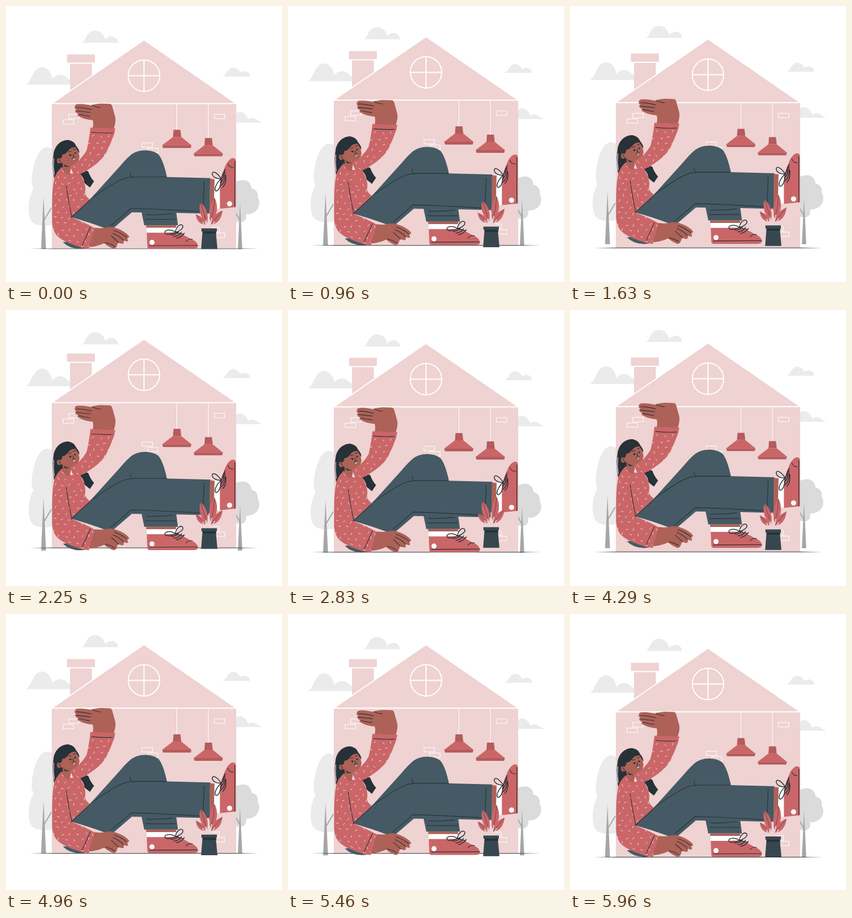
Write an HTML page that moves like this. It is 500 px wide and 500 px high and loops after 6 s.

```html
<!DOCTYPE html>
<html lang="en">
<head>
<meta charset="utf-8">
<title>House too small</title>
<style>
html, body { margin: 0; width: 100%; height: 100%; overflow: hidden; background: #fff; }
svg { display: block; width: 100vw; height: 100vh; }
.cloud, .tree1 { fill: #ebebeb; }
.tree2 { fill: #dbdbdb; }
.trunk { fill: #a6a6a6; }
.twig { fill: none; stroke: #a6a6a6; stroke-width: 2; }
.wall { fill: #efd2d2; }
.white { fill: none; stroke: #fff; stroke-width: 2; }
.thin { fill: none; stroke: #fff; stroke-width: 1; }
.sock { fill: #fff; }
.red { fill: #ca6668; }
.shade { fill: #b55b5c; }
.skin { fill: #ad6157; }
.dark { fill: #263238; }
.denim { fill: #455a64; }
.pot { fill: #37474f; }
.ink { fill: none; stroke: #263238; stroke-width: 1.1; stroke-linecap: round; stroke-linejoin: round; }
.lace { fill: none; stroke: #263238; stroke-width: 1.5; stroke-linecap: round; stroke-linejoin: round; }
.vein { fill: none; stroke: #263238; stroke-width: .6; }
.stem { fill: none; stroke: #efd2d2; stroke-width: 1.8; }
.dash { fill: none; stroke: #f3dede; stroke-width: 1; stroke-linecap: round; }
</style>
</head>
<body>
<svg id="stage" viewBox="0 0 500 500">
  <defs>
    <clipPath id="knit"><path id="knitBody"/><path id="knitArm"/></clipPath>
  </defs>
  <g id="scenery"></g>
  <g id="house"></g>
  <g id="person"></g>
  <g id="plant"></g>
</svg>
<script>
const $ = id => document.getElementById(id);
const path = (cls, d) => `<path class="${cls}" d="${d}"/>`;
const dot = (cls, x, y, r) => `<circle class="${cls}" cx="${x}" cy="${y}" r="${r}"/>`;
const box = (cls, x, y, w, h) => `<rect class="${cls}" x="${x}" y="${y}" width="${w}" height="${h}"/>`;

$('scenery').innerHTML = [
  path('cloud', 'M137.500 67C144 65 146 45 161 45C174 45 178 55 180 61C184 56 190 55 194 56C200 57 202 62 203.500 67Z'),
  path('cloud', 'M36 142.800C46 140 48 111 65.500 111C78 111 83 126 84 132C91 123 104 122 111 131L128 142.800Z'),
  path('cloud', 'M392 128C400 126 401 112 411 112C419 112 423 117 424 121C430 117 442 117 442 128Z'),
  path('cloud', 'M404 211.500C412 207 414 192 424 192C433 192 437 202 439 206C444 201 454 204 456 208Q461 209 463 211.500Z'),
  path('tree1', 'M75 256C58 254 47 292 46.500 318Q47 327 50 332C41 342 36 382 49 393C58 400 80 400 95 394V268Q86 257 75 256Z'),
  path('tree2', 'M410 322Q420 315 431 315.500Q443 317 445 331C453 332 457 338 456 347C461 355 459 367 452 372Q444 379 435 377Q437 389 427 392Q417 393 410 387Z'),
  path('trunk', 'M68 345L72.500 440.500H63.500Z'),
  path('twig', 'M69 388L82 366'),
  path('trunk', 'M424 357L428 440.500H420Z'),
  path('twig', 'M423.500 388L416 375')
].join('');

const lamp = (x, y) => path('thin', `M${x} 178V${y}`) +
  path('shade', `M${x - 6} ${y}H${x + 6.5}L${x + 8} ${y + 13}H${x - 7}Z`) +
  path('red', `M${x - 7} ${y + 13}H${x + 8}L${x + 26.5} ${y + 28}H${x - 26.5}Z`) +
  path('shade', `M${x - 26.5} ${y + 28}H${x + 26.5}L${x + 25} ${y + 33}H${x - 25}Z`);
const bricks = [[113.5, 196.7], [103.5, 206.7], [246.5, 248.5], [256.5, 258.5], [377.5, 196.7], [377.5, 411.7], [367.5, 401.7]];

$('house').innerHTML = [
  box('wall', 116, 100, 39.5, 60),
  box('wall', 110.5, 88.3, 50.5, 15),
  path('white', 'M110 104.200H161'),
  box('wall', 83, 177.3, 334, 263),
  path('dark', 'M43 440.400L84 440H417L458 440.400L417 440.900H84Z'),
  `<path class="wall" stroke="#fff" stroke-width="2" d="M83 177.200L250 62L417 177.200Z"/>`,
  dot('white', 250, 126.8, 28.5),
  path('white', 'M250 98.500V155.500M221.500 126.800H278.500'),
  bricks.map(([x, y]) => box('thin', x, y, 19, 8)).join(''),
  lamp(309.5, 224.7),
  lamp(366.5, 239.7)
].join('');

const bodyShape = 'M101 292Q92 300 88 311C82 335 84 365 83.500 393Q85 409 93 417C103 427 125 434 137 438L150 440L161.500 403Q140 391 120 384L152 351Q144 345 143 339Q145 330 142 320L134 302L118 304Z';
const armShape = 'M153 220.500L198 222L196 232Q190 249 182 265C174 281 155 293 142 301Q132 307 122 304L116 291Q136 280 146 262Q150 246 153 220.500Z';
$('knitBody').setAttribute('d', bodyShape);
$('knitArm').setAttribute('d', armShape);

let seed = 11;
const rand = () => (seed = (seed * 16807) % 2147483647) / 2147483647;
let flecks = '';
for (let y = 235, row = 0; y < 438; y += 10.5, row++) {
  for (let x = 86 + (row % 2) * 7; x < 198; x += 14) {
    const a = rand() * Math.PI;
    const cx = x + rand() * 4, cy = y + rand() * 4;
    const dx = Math.cos(a) * 1.8, dy = Math.sin(a) * 1.8;
    flecks += `M${(cx - dx).toFixed(1)} ${(cy - dy).toFixed(1)}l${(2 * dx).toFixed(1)} ${(2 * dy).toFixed(1)}`;
  }
}

const hair = [
  path('dark', 'M132 302Q143 297 149 300Q153 311 159.500 318L152 329L142 321Q142 312 132 302Z'),
  path('dark', 'M113 243C97 243 87 256 86 270C83 287 86 300 87 313Q92 301 103 293L112 270Z'),
  path('thin', 'M86.500 276Q85 292 87.500 306')
].join('');

const backLeg = [
  path('denim', 'M103 428Q116 441 137 440L150 438L135 425Z'),
  path('denim', 'M150 353L206 291Q216 279 224 272C237 259 263 259 276 269Q285 279 292 312L220 322L145 362Z'),
  path('denim', 'M245 371L250.500 397.500H311.500L308 371Z'),
  path('ink', 'M255 378.500Q280 379 302 376.500M253 386.500Q280 387 307 386.500'),
  path('skin', 'M254 397.500H308L308 402H254Z'),
  path('sock', 'M254.500 402H308L313 411H255Z'),
  path('red', 'M255 411H284Q297 410 308 411Q322 414 334 422Q348 427 347.500 436Q347 439.800 340 439.800H260Q256 440 256 435Z'),
  path('ink', 'M260 434.500Q300 434 347 434M326 427Q331 421 338 423'),
  path('lace', 'M307 410C297 403 286 407 288 411C290 416 301 413 307 410C308 400 316 394 320 398C323 403 313 409 307 410M299 415Q308 415 313 408M304 418Q313 418 318 410M309 421Q317 420 323 412M307 410L322 414'),
  dot('sock', 264.5, 428.5, 4.6)
].join('');

const head = [
  path('skin', 'M102 282L103 293Q104 304 113 306L119 291Z'),
  path('dark', 'M103 283Q108 291 118 291L116 295Q105 294 103 283Z'),
  path('skin', 'M100 264Q107 251 127 253Q131 261 132 268Q134 274 132 278Q131 291 122 291.500Q107 291 101 284Q94 288 92.500 282Q91 276 97 275Z'),
  path('dark', 'M92 275C89 255 101 244 113 243Q124 245 127 254Q133 260 133 267Q130 263 126 256Q117 256 113 262Q107 270 102 269Q102 275 98 277Z'),
  path('ink', 'M95 279Q99 279 98 284M113 265Q115 263 118 264M122 261L126 259M121 269L123 273L120.500 274'),
  path('dark', 'M114 270Q116 267 119 270L117 272.500ZM123 267Q125 264 127 266L126 268.500Z'),
  path('sock', 'M120.500 277.500Q123.500 277 125.500 274.500Q125 279 122 279Z'),
  path('ink', 'M120 277.500Q124 277 126 274')
].join('');

const frontLeg = [
  path('denim', 'M118 383L152 351C180 333 203 319 214 314Q222 310 232 310.500L290 310L370 312L369 376.500L308 375L228 374L196 401.500L183 404Q145 390 118 383Z'),
  path('ink', 'M153 350Q200 317 214 313Q222 310 236 310L290 310M225 302Q225 308 228 310M190 398Q210 382 226 367Q270 367.500 350 372.500M359 318L357 370M118 383L152 352'),
  path('skin', 'M369.500 313L378 314.500L377 371L369 376Z'),
  path('sock', 'M378 314L388 313L388 367L376.500 368Z'),
  path('red', 'M387.500 367.500V327Q388 311 395 296Q400 281 408 276.500Q417 273 416.500 284V364.500Z'),
  path('ink', 'M414.500 281V364M402 286Q404 293 412 293'),
  path('lace', 'M390 313C381 300 374 299 373.500 304C374 311 384 314 390 313C380 322 376 334 380.500 335.500C387 335 390 321 390 313M388 320Q396 316 394 302M390 325Q399 318 396 299M393 328Q400 321 398 307M390 313L397 296'),
  dot('sock', 405, 358.5, 4.7)
].join('');

const upperHand = path('skin', 'M127 178.500Q134 177 146 179L154 180.500Q160 177.500 172 177L188 177.500Q192 178 193 184L198 202Q199.500 210 195 223L157 222Q159 213 157 207Q146 206 138 203L130 199Q128 196 132 196Q124 193 125.500 189L128 189Q121 184 127 178.500Z') +
  path('ink', 'M128 184Q140 184 155 188M127 190Q141 192 153 193M132 196Q142 199 152 200M156 180Q164 184 171 184');

const lowerHand = path('skin', 'M161 402Q173 404 184 401Q196 400 208 406Q221 413 223 418Q223 421 219 420Q223 426 219 427L213 425Q215 431 210 431L203 429Q201 434 200 437Q197 442 190 438Q182 434 178 430Q165 436 150 437Z') +
  path('ink', 'M196 407Q211 412 219 420M194 412Q206 417 213 425M191 417Q199 424 204 429M180 429Q190 431 197 436');

$('person').innerHTML = [
  hair, backLeg, head,
  path('red', bodyShape),
  path('skin', 'M103 292Q101 301 113 306Q118 302 117 291Z'),
  upperHand,
  path('red', armShape),
  `<g clip-path="url(#knit)">${path('dash', flecks)}</g>`,
  path('ink', 'M155 229Q175 231 193 230M109 326Q113 355 119 382M153 401L138 434'),
  frontLeg, lowerHand
].join('');

const leaf = (d, vein) => path('red', d) + path('vein', vein);
$('plant').innerHTML = [
  leaf('M352 356C348 371 353 385 364 394C368 380 363 364 352 356Z', 'M352 356Q359 375 364 394'),
  leaf('M378 348C368 358 365 379 371 391C382 383 386 364 378 348Z', 'M378 348Q377 370 371 391'),
  leaf('M344 378C345 390 352 396 361 396C361 387 354 381 344 378Z', 'M344 378L361 396'),
  leaf('M392 371C380 375 372 384 371 396C382 396 391 386 392 371Z', 'M392 371L371 396'),
  path('stem', 'M366 404L362 388M368 404V376M369 404L373 384M370 404L378 390M364 404L356 391'),
  path('pot', 'M356 408H380L383 440.300H353.500Z'),
  path('dark', 'M356 408H380.500L381 412.500H356Z'),
  box('pot', 354, 403, 28, 5.7)
].join('');

const LOOP = 6000, RATE = 24, RISE = 10;
const bobs = { scenery: 3, house: 1.5, person: 3, plant: 6 };

// Straight rise and fall, stepped at the frame rate.
function draw(ms) {
  const t = (Math.floor((ms % LOOP + 4) * RATE / 1000) + 1) / RATE;
  for (const id in bobs) {
    const p = (t / bobs[id]) % 1;
    const y = -RISE * (1 - Math.abs(1 - 2 * p));
    $(id).setAttribute('transform', `translate(0 ${y.toFixed(3)})`);
  }
}

const start = performance.now();
function tick() {
  draw(performance.now() - start);
  requestAnimationFrame(tick);
}
tick();
</script>
</body>
</html>
```
